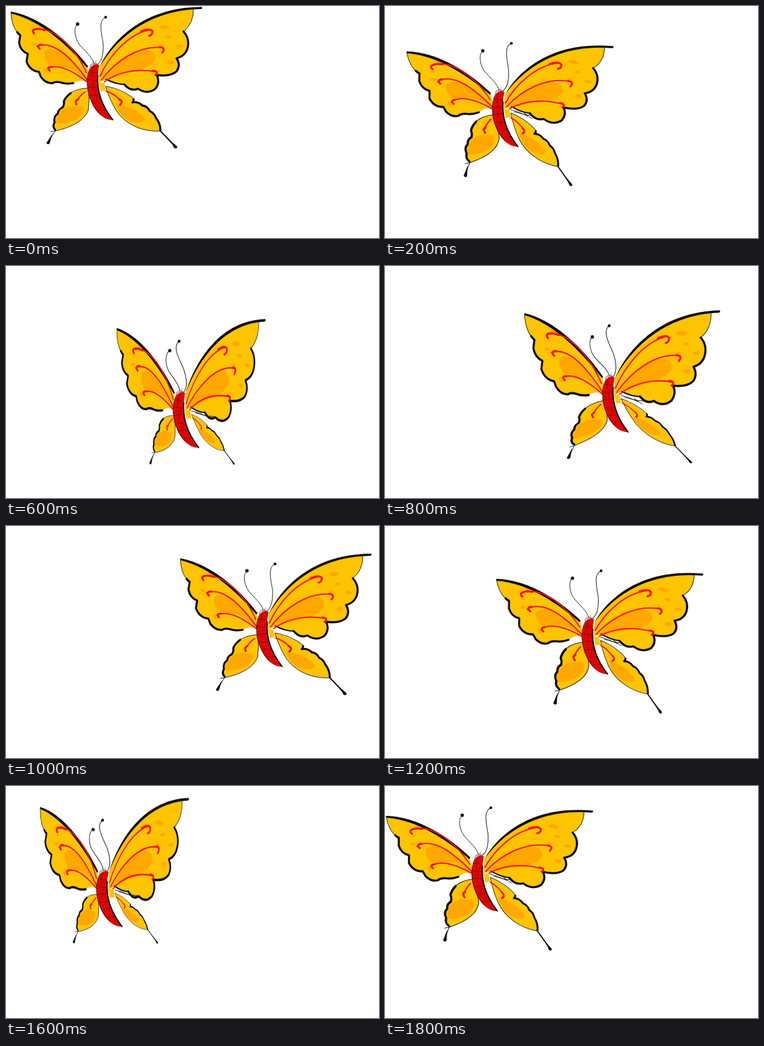
Animation, 599 px wide and 373 px high, one loop 2 s. Source, as an HTML page:

```html
<!DOCTYPE html>
<html lang="en">
<head>
<meta charset="utf-8">
<title>Butterfly</title>
<style>
html, body { margin: 0; width: 100%; height: 100%; overflow: hidden; background: #fff; }
svg { display: block; width: 100vw; height: 100vh; }
path { fill: none; stroke-linecap: round; stroke-linejoin: round; }
.y { fill: #ffc400; }
.o, .o path { fill: #ffa800; }
.k { fill: #0c0c0c; }
.red { fill: #e00404; }
.edge { stroke: #0c0c0c; stroke-width: 3.3; }
.mid { stroke: #0c0c0c; stroke-width: 2; }
.thin { stroke: #222; stroke-width: 1; }
.grey { stroke: #777; stroke-width: .9; }
.vein { stroke: #ff1010; stroke-width: 2; }
.hook { stroke: #ff1010; stroke-width: 3.2; }
.crack { stroke: #8c0808; stroke-width: 1; }
</style>
</head>
<body>
<svg viewBox="0 0 599 373" preserveAspectRatio="none">
<g id="fly">
  <g id="lowL">
    <path class="y" d="M132 132C114 132 98 142 93 153Q94 158 91 163Q84 166 83 173Q76 178 78 187Q74 194 79 201C106 195 126 184 132 168Q135 150 132 132Z"/>
    <path class="o" d="M80 187C83 170 98 157 113 162C130 159 127 171 116 181C104 189 86 191 80 187Z"/>
    <path class="thin" d="M79 201C106 195 126 184 132 168Q135 150 132 132C122 132 112 135 105 139"/>
    <path class="edge" d="M104 140Q96 146 93 153Q94 158 91 163Q84 166 83 173Q76 178 78 187Q74 194 79 199"/>
    <path class="vein" d="M127 138Q118 145 114 152"/>
    <path class="hook" d="M116 150Q110 152 113 158"/>
    <path class="thin" d="M72 202L79 201L70 215"/>
    <path class="k" d="M75 205L70 221Q67 224 65 220Z"/>
  </g>
  <g id="lowR">
    <path class="y" d="M160 129C180 134 198 142 205 149Q205 154 203 155Q212 153 219 160Q227 161 231 169Q238 172 241 180Q248 189 248 201C218 203 190 189 177 168Q166 150 160 129Z"/>
    <path class="o" d="M177 159C188 160 210 164 223 180C227 187 212 190 199 185C187 179 180 169 177 159Z"/>
    <path class="thin" d="M248 201C218 203 190 189 177 168Q166 150 160 129C180 132 198 142 205 149"/>
    <path class="edge" d="M205 150Q205 154 203 155Q212 153 219 160Q227 161 231 169Q238 172 241 180Q248 189 248 200"/>
    <path class="vein" d="M161 137Q174 141 183 151"/>
    <path class="hook" d="M182 150Q189 154 183 159"/>
    <path class="mid" d="M248 201L271 225"/>
    <path class="k" d="M258 212L273 224Q277 227 273 229Q269 229 268 224Z"/>
  </g>
  <g id="upL">
    <path class="y" d="M8 10C58 20 101 62 131 98L134 124Q123 117 113 122Q97 128 88 123Q79 121 75 124Q64 125 56 114L53 106Q38 104 33 89L35 77Q23 72 21 59L23 47Q9 38 8 10Z"/>
    <path class="o" d="M62 72C77 63 94 76 111 94Q124 108 129 120C111 100 97 95 75 99Q60 89 62 72Z"/>
    <g class="o"><path d="M51 34q5-5 11 0q-5 5-11 0zM39 59q5-4 9 2q-5 4-9-2zM60 101q6-4 8 3q-4 7-8-3zM42 47q5-3 7 1q-4 3-7-1z"/></g>
    <path class="k" d="M8 9C58 18 104 60 132 97L130 99C99 64 58 24 8 12Z"/>
    <path class="thin" d="M8 10Q9 32 18 42"/>
    <path class="edge" d="M18 42Q20 45 23 47L21 59Q23 72 35 77L33 89Q38 104 53 106L56 114Q64 125 75 124Q79 121 88 123Q97 126 108 124"/>
    <path class="vein" d="M43 39C64 31 91 50 108 72Q121 88 129 107M50 65C69 56 93 74 108 91Q122 106 131 120M67 100C83 93 106 103 130 122"/>
    <path class="hook" d="M45 44Q40 38 48 37Q54 36 62 39M54 69Q48 63 57 62M70 104Q65 98 73 98"/>
  </g>
  <g id="upR">
    <path class="y" d="M150 99C165 65 213 4 301 3Q302 28 285 41Q295 52 292 66Q289 80 274 84Q281 95 274 105Q264 114 242 111Q248 122 240 133Q227 143 212 133Q200 138 190 126Q177 126 161 118L149 123Z"/>
    <path class="o" d="M157 118C171 92 194 72 221 71Q243 71 239 87C230 105 197 106 157 120Z"/>
    <g class="o"><path d="M245 34q7-7 18 0q-6 7-18 0zM256 50q6-5 10 0q-4 6-10 0zM272 64q7-6 12 1q-6 4-12-1zM258 90q5-6 12 0q-4 9-12 0zM246 62q5-3 8 2q-5 3-8-2z"/></g>
    <path class="k" d="M150 99C165 64 213 2 314 1.5Q317 3 313 5C217 6 168 67 150 99Z"/>
    <path class="thin" d="M301 4Q302 28 285 41"/>
    <path class="edge" d="M285 41Q295 52 292 66Q289 80 274 84Q281 95 274 105Q264 114 242 111Q248 122 240 133Q227 143 212 133Q200 138 190 126"/>
    <path class="mid" d="M190 126Q177 126 161 118"/>
    <path class="vein" d="M151 113C165 82 194 46 231 38M153 119C174 91 212 62 251 67M158 122C181 105 211 100 242 106"/>
    <path class="hook" d="M217 41Q230 35 235 40Q236 46 230 48M247 66Q257 67 251 75M236 104Q246 105 240 111"/>
  </g>
  <g id="antL">
    <path class="thin" d="M115 29C108 34 110 51 118 62C127 73 139 82 141 92"/>
    <circle class="k" cx="115" cy="29" r="2.7"/>
  </g>
  <g id="antR">
    <path class="thin" d="M160 18C147 23 154 46 156 60C157 76 154 88 148 93"/>
    <circle class="k" cx="160" cy="18" r="2.2"/>
  </g>
  <path id="scratch" class="thin" d="M160 124Q174 127 187 134L181 129L194 138M166 127L183 132L196 133"/>
  <path class="y" d="M149 122L158 124L160 136L152 137Z"/>
  <g transform="translate(-1.5 -1)">
    <path class="red" d="M139 98Q147 91 151 97Q148 112 149 130C152 154 163 170 173 184C159 185 144 171 138 154C131 137 129 113 139 98Z"/>
    <path class="crack" d="M135 107L148 109M133 119L147 121M133 132L148 131M137 145L151 144M142 157L156 156M150 169L163 168M141 98L139 114M142 122L141 136M146 143L148 156"/>
    <path class="mid" d="M149 112Q146 150 173 184"/>
    <path class="thin" d="M138 98Q129 113 133 137Q138 160 152 174"/>
    <path class="grey" d="M136 98Q140 88 150 95M141 95L147 89M138 96L146 93L152 97"/>
  </g>
</g>
</svg>
<script>
const el = id => document.getElementById(id);

// Anchor points of each part at rest: root, tip, lobe
const rest = {
  upL: [[132, 122], [8, 11], [72, 123]],
  upR: [[152, 118], [314, 3], [230, 139]],
  lowL: [[133, 132], [78, 201], [96, 148]],
  lowR: [[160, 130], [247, 201], [205, 152]],
  antL: [[142, 92], [115, 29]],
  antR: [[148, 93], [160, 18]]
};

// Where the tip and lobe go in each wing pose
const poses = {
  level: {},
  wide: { upL: [[-7, 32], [73, 133]], upR: [[324, 23], [231, 146]],
          lowL: [[93, 209], [98, 152]], lowR: [[235, 215], [200, 160]], antR: [[161, 17]] },
  half: { upL: [[12, 8], [76, 123]], upR: [[299, -4], [217, 143]],
          lowL: [[82, 193], [97, 146]], lowR: [[243, 193], [200, 149]], antL: [[100, 35]], antR: [[140, 11]] },
  shut: { upL: [[40, -7], [85, 120]], upR: [[278, -22], [212, 141]],
          lowL: [[100, 191], [110, 143]], lowR: [[212, 188], [185, 149]], antL: [[125, 27]], antR: [[140, 12]] },
  high: { upL: [[5, -6], [72, 121]], upR: [[318, -11], [231, 139]],
          lowL: [[84, 205], [95, 154]], lowR: [[246, 205], [202, 156]], antL: [[114, 30]], antR: [[141, 12]] }
};

const STEP = 200;
const flight = [
  ['level', 0, 0], ['wide', 42, 43], ['half', 11, 132], ['shut', 138, 109], ['high', 219, 84],
  ['level', 272, 43], ['wide', 186, 55], ['half', 79, 46], ['shut', 15, 43], ['wide', 9, 18]
];

// Affine map that keeps the root and moves two other points
function affine([o, a, b], [p, q]) {
  const sub = v => [v[0] - o[0], v[1] - o[1]];
  const turn = v => [-v[1], v[0]];
  const u = sub(a), s = sub(p);
  const v = b ? sub(b) : turn(u), t = q ? sub(q) : turn(s);
  const det = u[0] * v[1] - v[0] * u[1];
  const row = i => [(s[i] * v[1] - t[i] * u[1]) / det, (t[i] * u[0] - s[i] * v[0]) / det];
  const [m, n] = row(0), [k, l] = row(1);
  return `matrix(${m} ${k} ${n} ${l} ${o[0] - m * o[0] - n * o[1]} ${o[1] - k * o[0] - l * o[1]})`;
}

function draw(ms) {
  const [name, x, y] = flight[Math.floor(ms / STEP) % flight.length];
  const pose = poses[name];
  for (const id in rest) {
    el(id).setAttribute('transform', affine(rest[id], pose[id] || rest[id].slice(1)));
  }
  el('scratch').style.display = name === 'level' ? 'none' : '';
  el('fly').setAttribute('transform', `translate(${x} ${y})`);
}

const start = performance.now();
function tick() {
  draw(performance.now() - start);
  requestAnimationFrame(tick);
}
tick();
</script>
</body>
</html>
```
